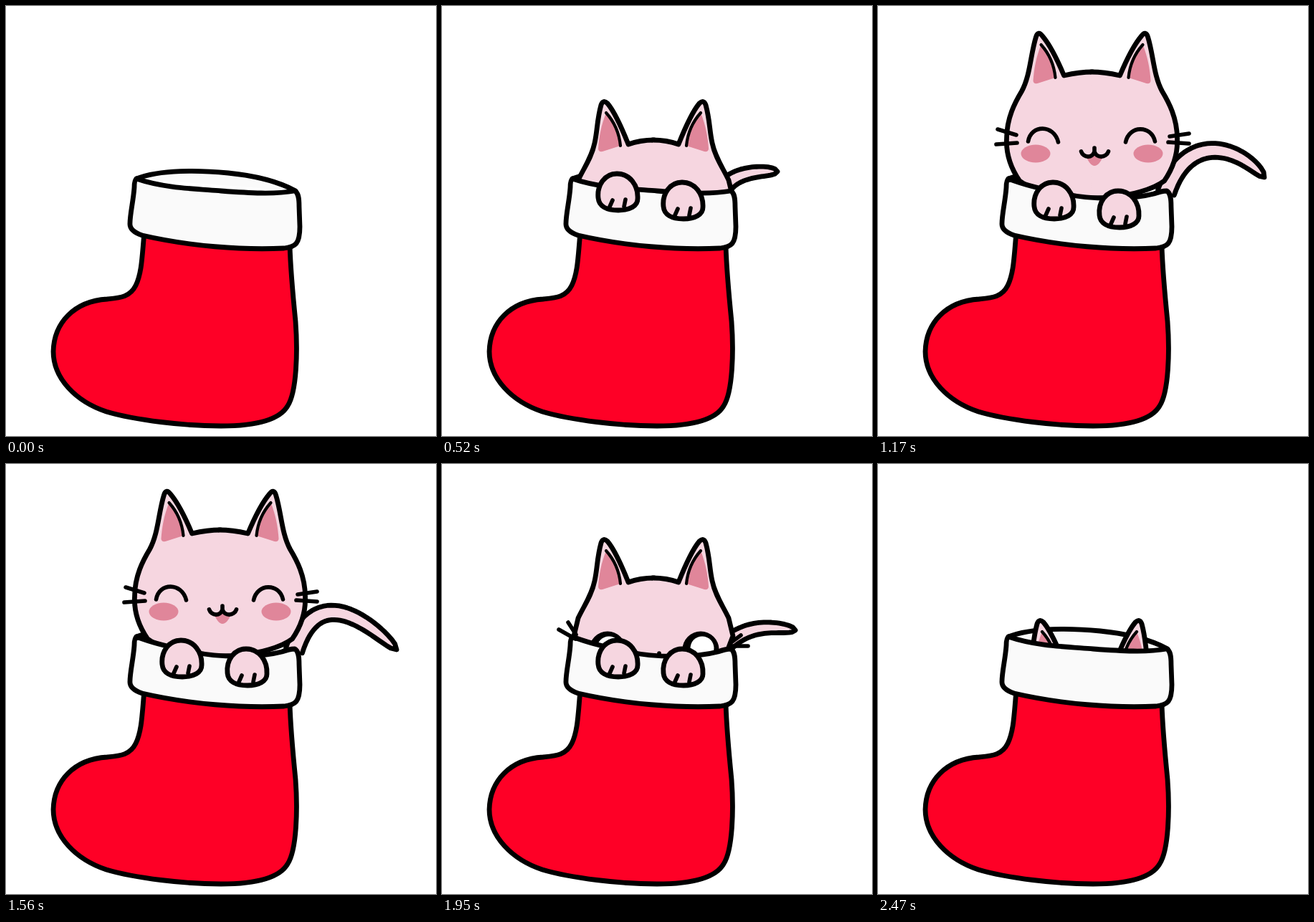
An HTML page for the animation above (2600 ms loop, 600x600 px).

```html
<!DOCTYPE html>
<html lang="en">
<head>
<meta charset="utf-8">
<title>Kitten in a stocking</title>
<style>
  html, body { margin: 0; width: 100%; height: 100%; overflow: hidden; background: #fff; }
  svg { display: block; width: 100vw; height: 100vh; }
  .ink { stroke: #000; stroke-width: 6.8; stroke-linecap: round; stroke-linejoin: round; fill: none; }
  .thin { stroke-width: 5.6; }
  .hair { stroke-width: 4.2; }
  .fur { fill: #f6d6e0; }
  .wool { fill: #fafafa; }
  .red { fill: #fe0026; }
  .rose { fill: #e0869a; }
  .white { fill: #fff; }
</style>
</head>
<body>
<svg viewBox="0 0 600 600">
  <defs>
    <clipPath id="above"><rect width="600" height="290"/></clipPath>

    <g id="paw">
      <path class="ink fur" d="M218 280C216 262 227 246 244 246C262 246 274 262 273 281C273 291 262 297 246 297C229 297 219 291 218 280Z"/>
      <path class="ink thin" d="M238 283L234 292M256 282L254 292"/>
    </g>
    <g id="paws">
      <use href="#paw"/>
      <use href="#paw" x="91" y="12"/>
    </g>

    <g id="eye">
      <circle r="25.5"/>
      <circle class="white" cx="2" cy="-2" r="16.5"/>
    </g>

    <!-- Left halves, drawn about x = 0 and mirrored -->
    <g id="ear">
      <path class="rose" d="M-71 86C-78 103 -81 121 -82 136Q-82 141 -76 140L-51 132C-54 114 -62 96 -71 86Z"/>
      <path class="ink hair" d="M-71 86C-62 96 -53 112 -51 132"/>
    </g>
    <g id="halfLow">
      <path class="ink fur" d="M1 187C-14 187 -24 189 -35 193C-43 173 -53 149 -64 136Q-70 130 -73 138C-79 160 -78 173 -82 191C-86 211 -97 226 -105 243L-111 268L-95 310H1"/>
      <use href="#ear" x="5" y="63"/>
    </g>
    <g id="halfHigh">
      <path class="ink fur" d="M1 124C-14 124 -26 126 -39 129C-47 110 -57 88 -69 74Q-75 66 -78 75C-86 101 -86 129 -98 151C-107 166 -119 188 -119 217C-120 239 -112 260 -101 276C-83 290 -42 300 1 300"/>
      <use href="#ear"/>
      <ellipse class="rose" cx="-78.5" cy="238" rx="20.5" ry="12.5"/>
    </g>
  </defs>

  <path class="ink wool" d="M182 241C215 228 270 229 310 233C350 237 382 246 404 258"/>

  <g clip-path="url(#above)">
    <path id="tail" class="ink fur"/>

    <g id="low">
      <g transform="translate(295 0)">
        <use href="#halfLow"/>
        <use href="#halfLow" transform="scale(-1 1)"/>
        <use href="#eye" x="-64" y="287"/>
        <use href="#eye" x="66" y="287"/>
        <path class="ink thin" d="M8 292V296"/>
      </g>
    </g>

    <g id="high">
      <g transform="translate(298.5 0)">
        <use href="#halfHigh"/>
        <use href="#halfHigh" transform="scale(-1 1)"/>
        <path class="rose" d="M-9 241C-4 250 -1 255 3.500 255C8 255 12 250 16 241L3.500 236Z"/>
        <path class="ink thin" d="M-15 235C-12 244 1 245 3.500 235V230V235C6 245 20 244 23 235"/>
        <g id="open">
          <use href="#eye" x="-69.500" y="226"/>
          <use href="#eye" x="68.500" y="226"/>
          <circle class="white" cx="-56.500" cy="240" r="4"/>
          <circle class="white" cx="55.500" cy="240" r="4"/>
        </g>
        <path id="shut" class="ink thin" d="M-89 221C-85 197 -53 197 -47 222M47 222C52 198 83 198 88 221"/>
      </g>
    </g>
    <use id="backPaws" href="#paws" y="-24"/>
  </g>

  <path class="ink red" d="M193 316C190 345 190 372 181 390C173 406 160 407 141 409C95 412 67 442 66 482C66 520 98 552 140 566C180 578 250 586 300 586C350 586 382 577 393 558C406 538 407 480 404 440C400 400 397 370 396 333"/>
  <path id="cuff" class="ink wool"/>
  <path id="whiskers" class="ink thin"/>
  <use id="frontPaws" href="#paws"/>
</svg>

<script>
const STEP = 130, COUNT = 20;
const el = id => document.getElementById(id);
const show = (id, on) => el(id).setAttribute("display", on ? "inline" : "none");
const lift = (id, y) => el(id).setAttribute("transform", `translate(0 ${y})`);

// Tapered outline with a round tip around a cubic curve
function ribbon(p, width) {
  const n = 32, left = [], right = [];
  for (let i = 0; i <= n; i++) {
    const t = i / n, u = 1 - t;
    const at = k => u*u*u*p[0][k] + 3*u*u*t*p[1][k] + 3*u*t*t*p[2][k] + t*t*t*p[3][k];
    const slope = k => u*u*(p[1][k] - p[0][k]) + 2*u*t*(p[2][k] - p[1][k]) + t*t*(p[3][k] - p[2][k]);
    const dx = slope(0), dy = slope(1);
    const w = width * (1 - 0.35 * t) * Math.sqrt(1 - t ** 10) / Math.hypot(dx, dy);
    left.push([at(0) + dy * w, at(1) - dx * w]);
    right.unshift([at(0) - dy * w, at(1) + dx * w]);
  }
  return "M" + left.concat(right).join("L");
}

// The tail slides out, swings over the cuff, then wags
function tailPath(k, step) {
  if (k < 6) {
    const b = 5 - k;
    return ribbon([[392, 256], [420 - 16 * b, 228 + 8 * b], [450 - 18 * b, 224 + 5 * b], [493 - 25 * b, 232 - b]], 10);
  }
  if (k === 6) return ribbon([[408, 256], [438, 212], [492, 232], [527, 268]], 12);
  const wag = step === 9 || step === 11 ? -1 : 1;
  return ribbon([[402, 260], [430, 178 - 2 * wag], [494 - 4 * wag, 198 + 7 * wag], [542 + 3 * wag, 249 + 10 * wag]], 12);
}

const cuffSides = "C408 261 409 268 409 280L410 308C410 332 404 336 388 338C330 341 255 335 190 320Q172 314 173 303C173 290 178 270 179 253Q179 243 182 241Z";
const cuffFlat = "M182 241C220 254 262 255 300 258C340 261 375 263 403 258" + cuffSides;
const cuffDipped = "M182 241C205 250 235 257 260 262C300 271 355 270 385 262Q396 258 403 258" + cuffSides;
const whiskersBent = "M176 221L187 238M163 231L186 244M402 250L417 239M402 254L427 254";
const whiskersWide = "M167 204L193 212M165 225L194 223M407 214L434 210M405 222L434 224";

function draw(step) {
  // Height of the kitten, 0 (hidden) to 7 (fully out)
  const k = Math.min(step, 7, COUNT - step);
  const high = k >= 6, happy = k === 7, rise = happy ? -32 : 0;

  show("low", k > 0 && !high);
  lift("low", Math.round((4 - k) * 28.3));
  show("high", high);
  lift("high", rise);
  show("open", !happy);
  show("shut", happy);

  show("tail", k > 1);
  el("tail").setAttribute("d", tailPath(k, step));

  show("backPaws", k === 3);
  show("frontPaws", k > 3);
  lift("frontPaws", k === 4 ? -12 : 0);

  el("cuff").setAttribute("d", k > 4 ? cuffDipped : cuffFlat);
  show("whiskers", k > 4);
  el("whiskers").setAttribute("d", high ? whiskersWide : whiskersBent);
  lift("whiskers", rise);
}

let start = null, last = 0;
function tick(now) {
  if (start === null) start = now;
  const step = Math.floor((now - start) / STEP) % COUNT;
  if (step !== last) draw(last = step);
  requestAnimationFrame(tick);
}
draw(0);
requestAnimationFrame(tick);
</script>
</body>
</html>
```
